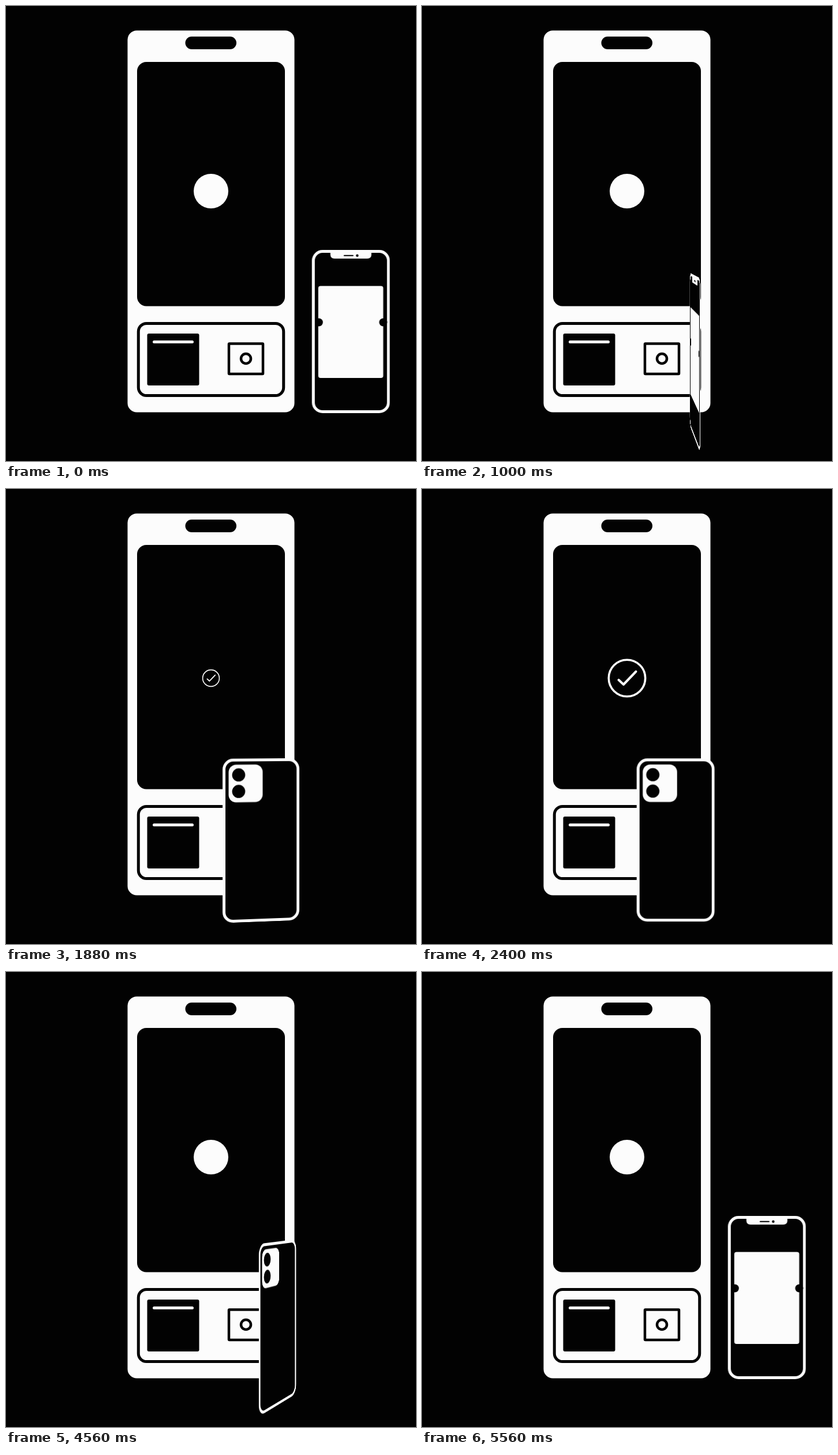
These frames come from a looping animation (710 by 789 pixels, 5920 ms). An HTML page:

```html
<!DOCTYPE html>
<html lang="en">
<head>
<meta charset="utf-8">
<title>Kiosk check-in</title>
<style>
  html, body { margin: 0; width: 100%; height: 100%; overflow: hidden; background: #020202; }
  #stage { position: relative; width: 710px; height: 789px; overflow: hidden; perspective: 1000px; perspective-origin: 355px 394.5px; }
  svg { position: absolute; left: 0; top: 0; display: block; }
  #phone { position: absolute; left: 0; top: 0; width: 135px; height: 283px; transform-style: preserve-3d; }
  #phone svg { backface-visibility: hidden; }
  #back { transform: rotateY(180deg); }
  .light { fill: #fcfcfc; }
  .dark { fill: #020202; }
  .line { fill: none; stroke: #020202; }
  .glow { fill: none; stroke: #fcfcfc; stroke-linecap: round; stroke-linejoin: round; }
  .body { fill: #020202; stroke: #fcfcfc; stroke-width: 5; }
</style>
</head>
<body>
<div id="stage">
  <svg width="710" height="789">
    <rect class="light" x="210.5" y="42.5" width="289" height="662" rx="16"/>
    <rect class="dark" x="310.5" y="53" width="88.5" height="22" rx="11"/>
    <rect class="dark" x="227" y="97" width="256" height="423.5" rx="16"/>
    <rect class="line" x="229.3" y="550.5" width="251.4" height="125" rx="14" stroke-width="5"/>
    <rect class="dark" x="244.5" y="568" width="90" height="90" rx="3"/>
    <rect class="light" x="254" y="580" width="71" height="5" rx="2.5"/>
    <rect class="line" x="386" y="585.5" width="59" height="52.5" rx="1" stroke-width="4.5"/>
    <circle class="line" cx="415.5" cy="611.5" r="8.5" stroke-width="4.5"/>
    <circle id="badge" class="light" r="30"/>
    <g id="check" class="glow">
      <circle r="31.7" stroke-width="3.6"/>
      <path d="M-14.5 3 L-6 11 L15.5 -11.5" stroke-width="4"/>
    </g>
  </svg>
  <div id="phone">
    <svg width="135" height="283">
      <rect class="body" x="2.5" y="2.5" width="130" height="278" rx="16"/>
      <path class="light" d="M32 4 H103 V8 Q103 15 96 15 H39 Q32 15 32 8 Z"/>
      <rect class="dark" x="55" y="8.7" width="17" height="2" rx="1"/>
      <circle class="dark" cx="78.5" cy="9.7" r="2.2"/>
      <rect class="light" x="11" y="62.5" width="112.5" height="159.5" rx="4"/>
      <circle class="dark" cx="12" cy="125.5" r="7"/>
      <circle class="dark" cx="123.5" cy="125.5" r="7"/>
    </svg>
    <svg id="back" width="135" height="283">
      <rect class="body" x="2.5" y="2.5" width="130" height="278" rx="16"/>
      <rect class="light" x="10.5" y="10.5" width="59.5" height="65" rx="13"/>
      <circle class="dark" cx="28" cy="28.2" r="11.4"/>
      <circle class="dark" cx="28" cy="56.7" r="11.4"/>
    </svg>
  </div>
</div>
<script>
const LOOP = 5920, STEP = 40, MIRROR = 5880;
const $ = id => document.getElementById(id);
const ramp = (t, from, to) => Math.min(1, Math.max(0, (t - from) / (to - from)));
const smooth = u => u * u * (3 - 2 * u);

// Monotone cubic curve through [time, value] points, at rest at both ends.
function curve(points) {
  const slope = i => (points[i + 1][1] - points[i][1]) / (points[i + 1][0] - points[i][0]);
  const tangent = points.map((_, i) => {
    if (i === 0 || i === points.length - 1) return 0;
    const a = slope(i - 1), b = slope(i);
    return a * b > 0 ? 2 * a * b / (a + b) : 0;
  });
  return t => {
    const last = points.length - 1;
    if (t <= points[0][0]) return points[0][1];
    if (t >= points[last][0]) return points[last][1];
    const i = points.findIndex(p => p[0] > t) - 1;
    const [t0, v0] = points[i], [t1, v1] = points[i + 1];
    const span = t1 - t0, u = (t - t0) / span, s = smooth(u);
    return v0 + (v1 - v0) * s
      + span * u * (1 - u) * ((1 - u) * tangent[i] - u * tangent[i + 1]);
  };
}

const phoneX = curve([[330, 597.2], [600, 545.6], [920, 484], [1010, 472], [1320, 472], [1520, 461], [1880, 442], [2130, 439.2]]);
const phoneY = curve([[330, 564.5], [600, 583.5], [920, 606.4], [1020, 608.7]]);
const turn = curve([[330, 0], [600, 37.5], [920, 80], [1000, 89], [1320, 125], [1520, 145], [1880, 174], [2130, 180]]);

function checkScale(t) {
  const grow = 1.26 * Math.sin(ramp(t, 1800, 2140) * Math.PI / 2);
  return grow - 0.26 * smooth(ramp(t, 2140, 2400));
}

function place(id, x, y, scale) {
  $(id).setAttribute("transform", `translate(${x} ${y}) scale(${scale})`);
  $(id).style.visibility = scale > 0 ? "visible" : "hidden";
}

function draw(now) {
  const frame = Math.floor(now % LOOP / STEP) * STEP;
  const t = Math.min(frame, MIRROR - frame);
  $("phone").style.transform =
    `translate(${phoneX(t) - 67.5}px, ${phoneY(t) - 141.5}px) rotateY(${-turn(t)}deg)`;
  place("badge", 355, 321, 1 - smooth(ramp(t, 1520, 1800)));
  place("check", 355, 328, checkScale(t));
}

let start;
function tick(now) {
  start ??= now;
  draw(now - start);
  requestAnimationFrame(tick);
}
draw(0);
requestAnimationFrame(tick);
</script>
</body>
</html>
```
